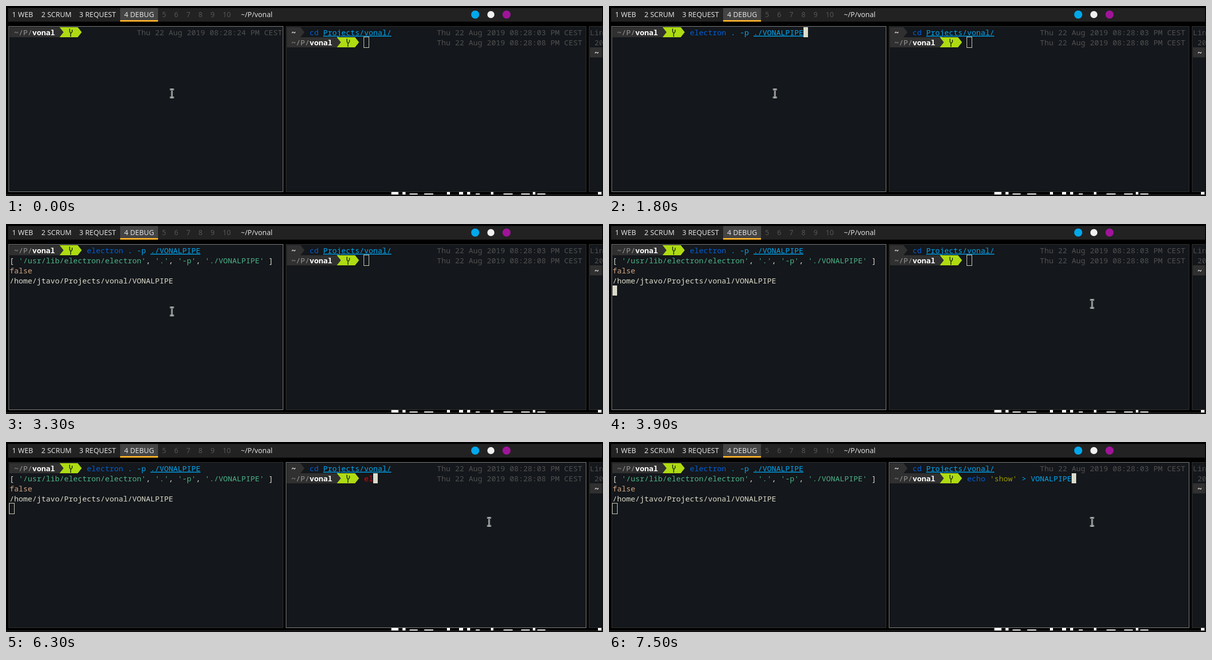
Animation, 1182 px wide and 377 px high, one loop 8000 ms. Source, as an HTML page:

```html
<!DOCTYPE html>
<html lang="en">
<head>
<meta charset="utf-8">
<title>Terminal session</title>
<style>
  html, body { margin: 0; width: 100%; height: 100%; overflow: hidden; background: #000; }
  svg { display: block; width: 1182px; height: 377px; }
  text { white-space: pre; }
  .mono { font: 15px "Noto Sans Mono", monospace; }
  .bar { font: 14px "Noto Sans", sans-serif; }
  .bold { font-weight: 700; }
  .link { text-decoration: underline; }
</style>
</head>
<body>
<svg id="stage" viewBox="0 0 1182 377"></svg>
<script>
const LOOP = 8000, CELL = 9, ROW = 20, TOP = 42;
const LEFT = 7, RIGHT = 556, THIRD = 1156;
const C = {
  pane: '#14171b', segment: '#303030', green: '#aedb12', dim: '#505050', fg: '#dcdccc',
  command: '#005fd7', param: '#00a6f0', error: '#f00000', quote: '#999900',
  string: '#4cb388', bool: '#d3a583', focus: '#8a8a8a', blur: '#333333'
};
const stage = document.getElementById('stage');
const timed = [];

function add(tag, attrs, content) {
  const el = document.createElementNS('http://www.w3.org/2000/svg', tag);
  for (const key in attrs) el.setAttribute(key, attrs[key]);
  if (content) el.textContent = content;
  stage.append(el);
  return el;
}

const rect = (x, y, width, height, fill) => add('rect', { x, y, width, height, fill });
const path = (d, fill) => add('path', { d, fill });
const frame = (x, y, width, height, stroke) =>
  add('rect', { x: x + .5, y: y + .5, width: width - 1, height: height - 1, fill: 'none', stroke });
const label = (x, str, fill = '#dfdfdf') => add('text', { x, y: 22, fill, class: 'bar' }, str);
const run = (x0, col, row, str, fill, style = '') =>
  add('text', { x: x0 + col * CELL, y: TOP + row * ROW + 16, fill, class: 'mono ' + style }, str);

// Shows the given elements only inside one span of the loop.
function during(from, to, ...els) {
  els.flat().forEach(el => timed.push({ el, from, to }));
}

function block(x0, col, row, under) {
  const els = [rect(x0 + col * CELL, TOP + row * ROW, CELL, ROW, C.fg)];
  if (under && under !== ' ') els.push(run(x0, col, row, under, C.pane));
  return els;
}
const hollow = (x0, col, row) =>
  frame(x0 + col * CELL - 1, TOP + row * ROW - 1, CELL + 2, ROW + 2, C.fg);

// Partly typed word, the cursor and the dimmed suggestion after it.
function typing(from, to, x0, row, typed, suggestion = '') {
  const col = 17 + typed.length, rest = suggestion.slice(typed.length);
  during(from, to, run(x0, 17, row, typed, C.error), block(x0, col, row, rest[0]));
  if (rest.length > 1) during(from, to, run(x0, col + 1, row, rest.slice(1), C.dim));
}

function prompt(x0, row) {
  const y = TOP + row * ROW, at = x0 + 99;
  rect(x0, y, 99, ROW, C.segment);
  run(x0, 1, row, '~/P/', '#969696');
  run(x0, 5, row, 'vonal', '#fff', 'bold');
  path(`M${at} ${y}h36l8 10l-8 10h-36z`, C.green);
  path(`M${at} ${y}l8 10l-8 10z`, C.segment);
  add('path', {
    d: `M${at + 20} ${y + 3}v6l2 3v7M${at + 25} ${y + 5}v4l-3 4`,
    fill: 'none', stroke: '#2b4208', 'stroke-width': 1.8
  });
}

function homePrompt(x0, row) {
  const y = TOP + row * ROW;
  rect(x0, y, 27, ROW, C.segment);
  path(`M${x0 + 27} ${y}l8 10l-8 10z`, C.segment);
  run(x0, 1, row, '~', '#fff', 'bold');
}

function drawBar() {
  rect(4, 4, 1176, 27, '#222');
  rect(226, 4, 75, 27, '#444');
  rect(226, 28, 75, 3, '#ffb52a');
  label(12, '1 WEB');
  label(70, '2 SCRUM');
  label(145, '3 REQUEST');
  label(234, '4 DEBUG');
  for (let n = 5; n <= 10; n++) label(309 + (n - 5) * 24, String(n), '#555');
  label(465, '~/P/vonal');
  [[929, '#00a8ec'], [960, '#f0f0f0'], [991, '#a0149a']].forEach(([cx, fill], i) =>
    add('circle', { cx, cy: 17, r: i === 1 ? 7 : 8, fill }));
}

function drawPanes() {
  [[5, 544], [554, 595], [1154, 40]].forEach(([x, w]) => {
    rect(x, 40, w, 329, C.pane);
    frame(x, 40, w, 329, C.blur);
  });
  during(0, 4500, frame(5, 40, 544, 329, C.focus));
  during(4500, LOOP, frame(554, 40, 595, 329, C.focus));
}

function drawLeft() {
  prompt(LEFT, 0);
  during(0, 1800, run(LEFT, 28, 0, 'Thu 22 Aug 2019 08:28:24 PM CEST', C.dim));
  during(100, 800, block(LEFT, 17, 0));
  typing(1100, 1400, LEFT, 0, 'e', 'electron4');
  typing(1400, 1800, LEFT, 0, 'el', 'electron4');
  during(1800, LOOP,
    run(LEFT, 17, 0, 'electron', C.command),
    run(LEFT, 26, 0, '. -p', C.param),
    run(LEFT, 31, 0, './VONALPIPE', C.param, 'link'));
  during(1800, 2400, block(LEFT, 42, 0));
  during(2600, 3300, block(LEFT, 0, 1));

  const output = [run(LEFT, 0, 1, '[', C.fg)];
  let col = 2;
  ['/usr/lib/electron/electron', '.', '-p', './VONALPIPE'].forEach((arg, i, all) => {
    const quoted = `'${arg}'`;
    output.push(run(LEFT, col, 1, quoted, C.string));
    col += quoted.length;
    if (i < all.length - 1) output.push(run(LEFT, col, 1, ',', C.fg));
    col += 2;
  });
  output.push(
    run(LEFT, col - 1, 1, ']', C.fg),
    run(LEFT, 0, 2, 'false', C.bool),
    run(LEFT, 0, 3, '/home/jtavo/Projects/vonal/VONALPIPE', C.fg));
  during(3300, LOOP, output);
  during(3900, 4500, block(LEFT, 0, 4));
  during(4500, LOOP, hollow(LEFT, 0, 4));
}

function drawRight() {
  homePrompt(RIGHT, 0);
  run(RIGHT, 5, 0, 'cd', C.command);
  run(RIGHT, 8, 0, 'Projects/vonal/', C.param, 'link');
  run(RIGHT, 33, 0, 'Thu 22 Aug 2019 08:28:03 PM CEST', C.dim);
  prompt(RIGHT, 1);
  during(0, 7500, run(RIGHT, 33, 1, 'Thu 22 Aug 2019 08:28:08 PM CEST', C.dim));
  during(0, 4500, hollow(RIGHT, 17, 1));
  during(4500, 5100, block(RIGHT, 17, 1));

  const electron = 'electron4 . -p';
  typing(5600, 5700, RIGHT, 1, 'e');
  typing(5700, 5800, RIGHT, 1, 'e', electron);
  typing(5800, 6000, RIGHT, 1, 'el', electron);
  typing(6000, 6300, RIGHT, 1, 'ele', electron);
  typing(6300, 6500, RIGHT, 1, 'el');
  typing(6500, 6700, RIGHT, 1, 'e');
  during(6700, 6900, block(RIGHT, 17, 1));
  typing(6900, 7100, RIGHT, 1, 'e', electron);
  typing(7100, 7500, RIGHT, 1, 'ec', 'echo 1 > ./app');
  during(7500, LOOP,
    run(RIGHT, 17, 1, 'echo', C.command),
    run(RIGHT, 22, 1, "'show'", C.quote),
    run(RIGHT, 29, 1, '> VONALPIPE', C.param),
    block(RIGHT, 40, 1));
}

function drawEdges() {
  run(THIRD, 0, 0, 'Lin', C.dim);
  run(THIRD, 1, 1, '20', C.dim);
  homePrompt(THIRD, 2);
  // Tops of large wallpaper letters below the panes.
  [[763, 14], [785, 6], [873, 6], [897, 8], [913, 6], [960, 5], [1043, 5], [1172, 7]]
    .forEach(([x, w]) => rect(x, 369, w, 5, '#fff'));
  [[799, 16], [828, 18], [930, 8], [985, 18], [1020, 17], [1052, 16]]
    .forEach(([x, w]) => rect(x, 372, w, 2, '#fff'));
  rect(0, 374, 1182, 1, '#303030');
  rect(0, 375, 1182, 2, '#0c0c0c');
  rect(1180, 0, 1, 374, '#0c0c0c');
}

drawBar();
drawPanes();
drawLeft();
drawRight();
drawEdges();
const beam = 'M-4 -8h3l1 1l1 -1h3M0 -7v14M-4 8h3l1 -1l1 1h3';
const mouse = add('g', {});
[['#fff', 3], ['#000', 1]].forEach(([stroke, width]) =>
  mouse.append(add('path', { d: beam, fill: 'none', stroke, 'stroke-width': width })));

function render(now) {
  const t = now % LOOP;
  for (const { el, from, to } of timed)
    el.style.display = t >= from && t < to ? '' : 'none';

  // The pointer moves in 100 ms steps along a sagging curve.
  const p = Math.min(1, Math.max(0, (Math.floor(t / 100) * 100 - 3300) / 600));
  const u = p * p * (3 - 2 * p);
  const x = 328.5 + 628 * u, y = 173.5 - 15 * u + 60 * u * (1 - u);
  mouse.setAttribute('transform', `translate(${x} ${y})`);
}

const start = performance.now();
function tick() {
  render(performance.now() - start);
  requestAnimationFrame(tick);
}
tick();
</script>
</body>
</html>
```
